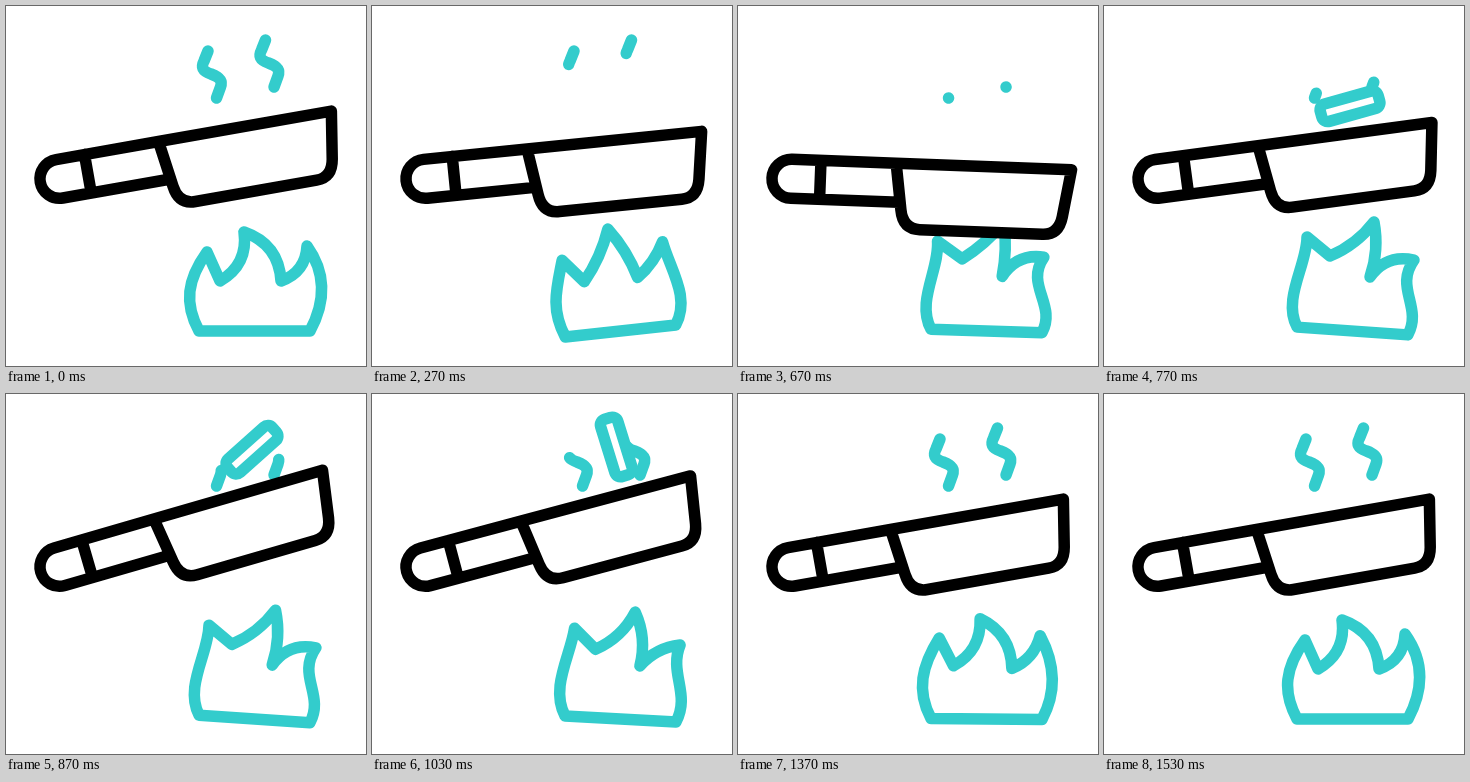
Write an HTML page that moves like this. It is 360 by 360 pixels and loops after 1.67 s.

```html
<!DOCTYPE html>
<html>
<head>
<meta charset="utf-8">
<style>
  html, body { margin: 0; height: 100%; overflow: hidden; background: #fff; }
  svg { display: block; width: 100vw; height: 100vh; }
</style>
</head>
<body>
<svg viewBox="0 0 360 360" fill="none" stroke="#3cc" stroke-width="11.5" stroke-linecap="round" stroke-linejoin="round">
  <path id="flame"/>
  <g id="steam">
    <path id="wisp" pathLength="1" d="M210.5 92L214.5 81C217 74 213 71 205 68C196 65 195 61 198 55L202 45"/>
    <use href="#wisp" x="57.5" y="-11"/>
  </g>
  <rect id="food" x="-30" y="-9" width="60" height="18" rx="6"/>
  <path id="pan" fill="#fff" stroke="#000"
    d="M104 -19.5H0A19.5 19.5 0 0 0 0 19.5H108M28.8 -19.5V19.5M104 -19.5L110.5 27Q113 46 130 46H253Q269 46 272 28L279.5 -19.5Z"/>
</svg>
<script>
const LOOP = 1670;
const el = id => document.getElementById(id);
const flame = el('flame'), steam = el('steam'), food = el('food'), pan = el('pan');

const ramp = (t, from, to) => Math.min(1, Math.max(0, (t - from) / (to - from)));
const ease = (t, from, to) => { const u = ramp(t, from, to); return u * u * (3 - 2 * u); };
const mix = (a, b, k) => Array.isArray(a) ? a.map((v, i) => mix(v, b[i], k)) : a + (b - a) * k;

// Flame pose: tilt of the base, three tips [x, y, curl] and the two valleys between them
const upright = [0, [[201, 246, 1], [238, 226, 1], [301, 240, 1]], [[214, 275], [275, 275]]];
const leanLeft = [-17, [[171, 269, -1], [232, 218, -1], [272, 228, -0.7]], [[209, 277], [249, 265]]];
const leanRight = [4, [[203, 231, 0], [270, 216, 0.4], [310, 254, -1]], [[226, 250], [266, 271]]];

// Control point of the edge between a valley and a tip, bowed sideways by the tip's curl
function bow([vx, vy], [x, y, curl]) {
  const bend = curl / 3;
  return [(x + vx) / 2 - (y - vy) * bend, (y + vy) / 2 + (x - vx) * bend];
}

function flamePath([tilt, [left, mid, right], [valleyL, valleyR]]) {
  const angle = tilt * Math.PI / 180;
  const corner = side => [248.5 + side * 55.5 * Math.cos(angle), 325 + side * 55.5 * Math.sin(angle)];
  const belly = side => { const [x, y] = corner(side); return [x + side * 15, y - 28]; };
  const flank = ([x, y, curl], side) => [x + side * 20 * curl, y + 28];
  const at = (x, y) => [x, y];
  return [
    'M', corner(-1),
    'C', belly(-1), flank(left, -1), at(...left),
    'L', valleyL,
    'Q', bow(valleyL, mid), at(...mid),
    'Q', bow(valleyR, mid), valleyR,
    'Q', bow(valleyR, right), at(...right),
    'C', flank(right, 1), belly(1), corner(1), 'Z'
  ].join(' ');
}

function drawFlame(t) {
  let pose = mix(upright, leanLeft, ease(t, 100, 520));
  pose = mix(pose, leanRight, ease(t, 520, 710));
  pose = mix(pose, upright, ease(t, 820, 1530));
  flame.setAttribute('d', flamePath(pose));
}

// Steam fades upwards out of sight, then grows again from below
function drawSteam(t) {
  const start = t < 500 ? ease(t, 0, 400) : 0;
  const end = t < 500 ? 1 : ease(t, 660, 1270);
  steam.style.display = end > start ? '' : 'none';
  steam.setAttribute('stroke-dasharray', `${end - start} 3`);
  steam.setAttribute('stroke-dashoffset', -start);
}

function drawFood(t) {
  const rise = ramp(t, 660, 950), fall = ramp(t, 950, 1250);
  const y = 45 + 145 * (1 - rise) ** 2 + 110 * fall ** 2;
  const angle = -10 - 180 * ease(t, 706, 1323);
  food.style.display = t > 660 && t < 1250 ? '' : 'none';
  food.setAttribute('transform', `translate(${mix(246, 240, fall)} ${y}) rotate(${angle})`);
}

function drawPan(t) {
  const angle = -10 + 16.5 * ease(t, 140, 535) - 24.5 * ease(t, 576, 930) + 8 * ease(t, 930, 1170);
  pan.setAttribute('transform', `translate(53.5 172.8) rotate(${angle})`);
}

const begin = performance.now();
function tick() {
  const t = (performance.now() - begin) % LOOP;
  for (const draw of [drawFlame, drawSteam, drawFood, drawPan]) draw(t);
  requestAnimationFrame(tick);
}
tick();
</script>
</body>
</html>
```
